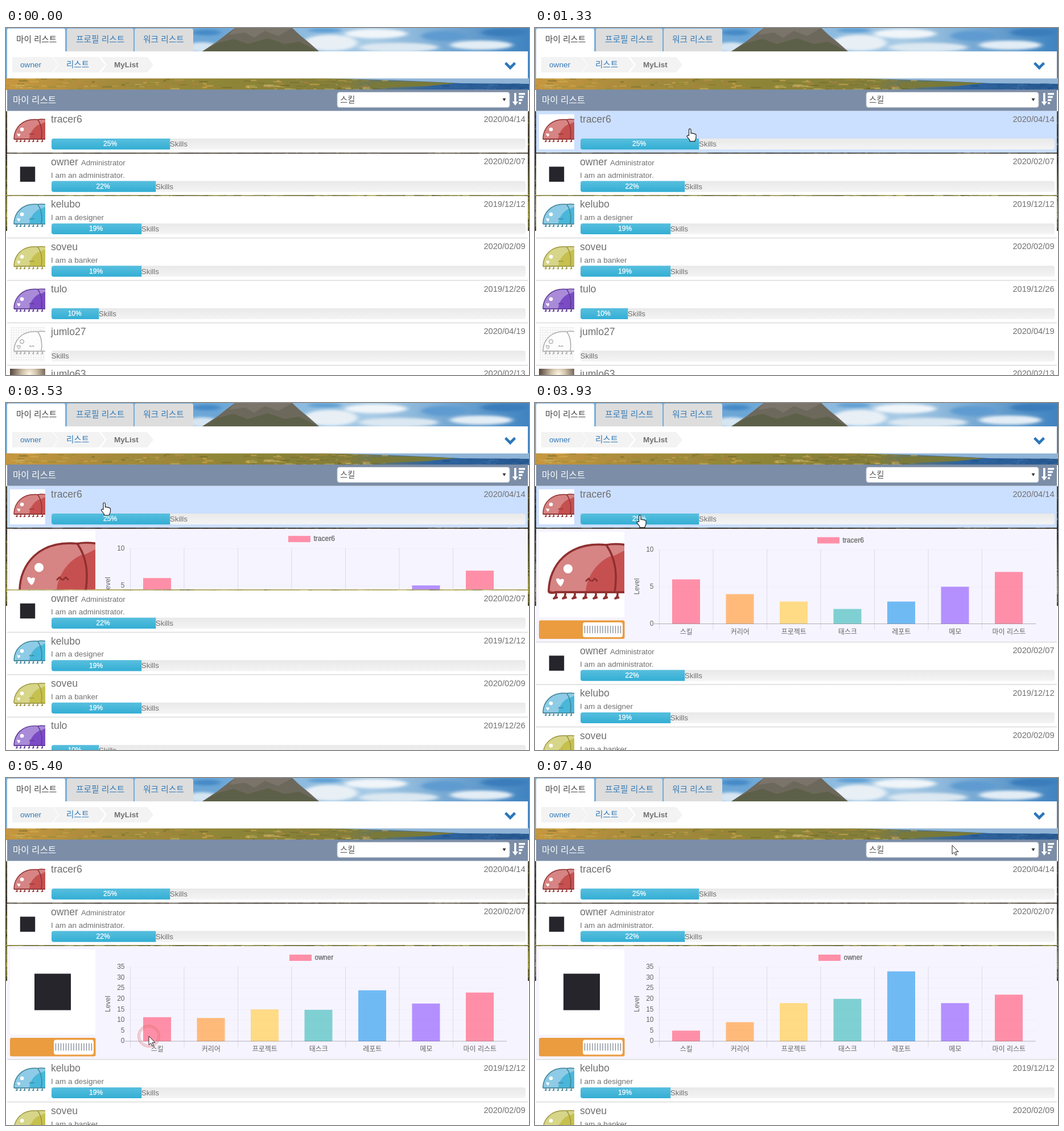
An HTML page for the animation above (8 s loop, 919 by 609 pixels).

```html
<!DOCTYPE html>
<html lang="ko">
<head>
<meta charset="utf-8">
<title>마이 리스트</title>
<style>
html, body { margin: 0; width: 100%; height: 100%; overflow: hidden; background: #fff; }
svg { display: block; }
text { font-family: "Liberation Sans", "Noto Sans CJK KR", "Noto Sans CJK JP", sans-serif; fill: #707070; }
.ko { font-family: "Noto Sans CJK KR", "Noto Sans CJK JP", sans-serif; }
.link { fill: #337ab7; }
.axis text { font-size: 12px; fill: #666; }
</style>
</head>
<body>
<svg id="stage" width="919" height="609" viewBox="0 0 919 609"></svg>
<script>
const LOOP = 8000, TOP = 146, PITCH = 74.45, PANEL_Y = TOP + PITCH, PANEL_H = 200;
const OPEN_AT = 3215, OPEN_MS = 600, SWAP_AT = 5195, CLICKS = [3130, 5150];
const BASE = 387.5, PLOT = 130, STEP = 94.5, LEFT = 218.5;

const rows = [
  { name: 'tracer6', date: '2020/04/14', pct: 25, bug: ['#d68484', '#c65050', '#8f3030'] },
  { name: 'owner', role: 'Administrator', about: 'I am an administrator.', date: '2020/02/07', pct: 22 },
  { name: 'kelubo', about: 'I am a designer', date: '2019/12/12', pct: 19, bug: ['#8ecbe6', '#49b7da', '#3c8296'] },
  { name: 'soveu', about: 'I am a banker', date: '2020/02/09', pct: 19, bug: ['#d6d588', '#c6c04e', '#9c9640'] },
  { name: 'tulo', date: '2019/12/26', pct: 10, bug: ['#a98bd9', '#7b4bc6', '#5a3792'] },
  { name: 'jumlo27', date: '2020/04/19', pct: 0, bug: ['#fdfdfd', '#fdfdfd', '#aaa'], grid: true },
  { name: 'jumlo63', date: '2020/02/13', pct: 0, photo: true }
];
const charts = [
  { who: 0, max: 10, vals: [6, 4, 3, 2, 3, 5, 7], legend: 496 },
  { who: 1, max: 35, vals: [5, 9, 18, 20, 33, 18, 22], legend: 498 }
];
const cats = ['스킬', '커리어', '프로젝트', '태스크', '레포트', '메모', '마이 리스트'];
const hues = ['#ff8fa8', '#ffba7a', '#ffdb86', '#7fd0d2', '#70baf4', '#b490ff', '#ff8fa8'];

// time, x, y of the pointer
const path = [
  [600, -16, 428], [1330, 272, 178], [1400, 258, 177], [1470, 254, 177], [1670, 199, 176], [1930, 199, 176],
  [2150, 192, 240], [2470, 190, 240], [2720, 172.5, 176], [3700, 172.5, 176], [4150, 206, 240], [4400, 246, 325],
  [4670, 248, 430.5], [4850, 251, 453], [5900, 251, 453], [6730, 648, 206], [6800, 648, 206], [7400, 733, 118]
];

const clamp = v => Math.max(0, Math.min(1, v));
const swing = p => 0.5 - Math.cos(Math.PI * clamp(p)) / 2;
const outQuart = p => 1 - (1 - clamp(p)) ** 4;
const $ = id => document.getElementById(id);
const range = n => [...Array(n).keys()];

let seed = 7;
const rnd = () => (seed = seed * 16807 % 2147483647) / 2147483647;

const rect = (x, y, w, h, fill, more = '') =>
  `<rect x="${x}" y="${y}" width="${w}" height="${h}" fill="${fill}" ${more}/>`;
const text = (x, y, size, str, more = '') =>
  `<text x="${x}" y="${y}" font-size="${size}" ${more}>${str}</text>`;
const shape = (d, fill, more = '') => `<path d="${d}" fill="${fill}" ${more}/>`;
const gradient = (id, stops, dir = 'x2="0" y2="1"') => `<linearGradient id="${id}" ${dir}>` +
  stops.map(([at, c]) => `<stop offset="${at}" stop-color="${c}"/>`).join('') + '</linearGradient>';

function specks(n, x, y, w, h, colors) {
  return range(n).map(() => rect((x + rnd() * w).toFixed(1), (y + rnd() * h).toFixed(1),
    (3 + rnd() * 16).toFixed(1), (1 + rnd() * 2).toFixed(1), colors[Math.floor(rnd() * colors.length)], 'opacity=".55"')).join('');
}

function landscape() {
  const cloud = (x, y, rx, ry, c) => `<ellipse cx="${x}" cy="${y}" rx="${rx}" ry="${ry}" fill="${c}"/>`;
  return rect(0, 0, 919, 88, 'url(#sky)') +
    '<g filter="url(#soft)">' +
    cloud(345, 34, 30, 9, '#d5e5f2') + cloud(352, 8, 25, 5, '#4489c6') + cloud(570, 26, 48, 14, '#e8f0f6') +
    cloud(650, 10, 55, 8, '#f0f5f9') + cloud(690, 34, 70, 8, '#dce8f1') + cloud(770, 14, 40, 9, '#5e9bd0') +
    cloud(835, 30, 55, 8, '#e3edf5') + cloud(875, 8, 40, 7, '#3b7dbb') + cloud(560, 4, 30, 4, '#5d9fd4') + '</g>' +
    shape('M345 41L372 23 390 9 402 0H503L517 13 533 26 550 41Z', '#6d685c') +
    shape('M345 41L372 26 400 19 425 28 460 18 490 28 515 24 550 41Z', '#5d6048') +
    shape('M402 0L392 12 420 8 436 17 455 5 478 14 503 0Z', '#7b746a') +
    rect(0, 88, 919, 21, 'url(#land)') +
    specks(170, 0, 88, 680, 20, ['#d8b050', '#6d6428', '#a6913e', '#8b8a38', '#b7803c', '#c9b766']) +
    shape('M560 88H919V98L800 97 690 92Z', '#8fb4d6') +
    shape('M640 95Q700 91 790 97L740 102 640 106Z', '#78793a') +
    specks(26, 760, 97, 150, 10, ['#21508a', '#3e74ab']) +
    rect(0, 146, 919, 210, 'url(#ground)') +
    specks(130, -8, 216, 927, 4, ['#15110d', '#5d4a35', '#37301f', '#8a8272']) +
    specks(130, -8, 291, 927, 5, ['#b3a83e', '#2f3018', '#77792e', '#c9bd6a']) +
    specks(90, -8, 324, 927, 6, ['#c8b74a', '#73762e', '#e0d38a', '#4b5020']) +
    specks(40, -8, 146, 10, 208, ['#1b1812', '#a59a4c', '#5d5a30']) +
    specks(40, 915, 146, 4, 208, ['#1b1812', '#a59a4c', '#5d5a30']) +
    rect(0, 356, 919, 253, '#fff') + rect(2, 356, 915, 253, '#dedede');
}

function header() {
  const tab = (x, w, fill) => shape(`M${x} 41V4q0-3 3-3H${x + w - 3}q3 0 3 3V41Z`, fill);
  const crumb = (x, tail, tip, notch) => shape(`M${x} 51H${tail}L${tip} 64.5 ${tail} 78H${x}${notch ? 'l10-13.5Z' : 'Z'}`, '#f3f3f3');
  return tab(2, 102, '#fff') + tab(107, 117, '#ddd') + tab(226, 103, '#ddd') +
    text(18, 25, 14.6, '마이 리스트', 'class="ko" style="fill:#444"') +
    text(123, 25, 14.7, '프로필 리스트', 'class="ko link"') +
    text(241, 25, 14.7, '워크 리스트', 'class="ko link"') +
    rect(2, 41, 915, 47.5, '#fff') +
    crumb(11, 81, 92) + crumb(83, 163, 174, true) + crumb(167, 248, 259, true) +
    text(25, 69, 13.6, 'owner', 'class="link"') +
    text(106, 68.5, 14.5, '리스트', 'class="ko link"') +
    text(190, 69, 13.5, 'MyList', 'font-weight="bold"') +
    shape('M876 63l3.2-3.2 6.8 6.8 6.8-6.8 3.2 3.2-10 10.2Z', '#2b76bb') +
    rect(2, 108, 915, 37.5, '#7b8da7') +
    text(12, 131.5, 15.6, '마이 리스트', 'class="ko" style="fill:#fff"') +
    rect(582, 112.5, 303, 27, '#fff', 'rx="4" stroke="#b5bcc6"') +
    text(587, 131, 14.3, '스킬', 'class="ko" style="fill:#555"') +
    shape('M872.5 123.5h6l-3 5Z', '#333') +
    shape('M893 114h3.6v15h3.4l-5.2 7-5.2-7H893Z', '#fff') +
    [11, 8.8, 6.4, 4].map((w, i) => rect(901, 114 + i * 5.4, w, 3.3, '#fff')).join('');
}

// drawn in a 150 by 150 box
function beetle([skin, wing, line]) {
  const legs = [30, 46, 63, 82, 100, 118, 138].map(x => `M${x} 107q1 7-4 10l7-2`).join('');
  return `<g stroke="${line}" stroke-width="3.6" stroke-linejoin="round">` + shape(legs, 'none') +
    shape('M17 104C18 60 50 17 118 23Q134 20 152 23V106H30Q17 109 17 104Z', skin) +
    shape('M82 106C84 75 106 50 128 42Q136 72 133 106ZM133 106Q136 70 130 43L152 32V106Z', wing, 'stroke="none"') +
    shape('M118 23Q141 55 133 106M17 104Q20 108 30 106H152', 'none') +
    shape('M82 87l5-5 5 5M93 87l5-5 5 5', 'none', 'stroke-width="2.6"') + '</g>' +
    `<g fill="#fff" stroke="${line}" stroke-width="${skin === '#fdfdfd' ? 3 : 0}"><circle cx="51" cy="65" r="8"/>` +
    '<path d="M30 83q4-3 7 1q4-3 7 0q-1 8-6 12q-7-5-8-13Z"/></g>';
}

function avatar(r) {
  let art = rect(0, 0, 150, 150, r.photo ? 'url(#snap)' : '#fff');
  if (r.grid) art += shape(range(14).map(i => `M${6 + i * 10.5} 0V150M0 ${6 + i * 10.5}H150`).join(''), 'none', 'stroke="#e8e8e8" stroke-width="2"');
  if (r.bug) art += beetle(r.bug);
  else if (!r.photo) art += rect(43, 43, 64, 64, '#25252b');
  return `<svg width="150" height="150">${art}</svg>`;
}

function row(r, i) {
  const w = 833 * r.pct / 100;
  return `<g id="row${i}">` + rect(2, 0, 915, 72.8, '#fff', `id="back${i}"`) +
    `<g transform="translate(7 5.2) scale(.413)">${avatar(r)}</g>` +
    text(79, 20.3, 17.6, r.name + (r.role ? `<tspan dx="5" font-size="13.2">${r.role}</tspan>` : '')) +
    text(79, 42.2, 13.5, r.about || '') +
    text(912.5, 18.8, 14.6, r.date, 'text-anchor="end"') +
    rect(80, 48, 833, 19.2, 'url(#track)', 'rx="4"') +
    (w ? shape(`M84 48H${80 + w}V67.2H84q-4 0-4-4V52q0-4 4-4Z`, 'url(#fill)') +
      text(80 + w / 2 - 1, 61.3, 12, r.pct + '%', 'text-anchor="middle" style="fill:#fff" stroke="#fff" stroke-width=".25"') : '') +
    text(79.5 + w, 62.2, 13.4, 'Skills') + '</g>';
}

function axes(c, k) {
  const n = c.max / 5;
  const ticks = range(n + 1).map(i => {
    const y = BASE - PLOT * i / n;
    return text(208.5, y + 3.3, 12, i * 5, 'text-anchor="end"') +
      shape(`M209 ${y}H880`, 'none', `stroke="#000" stroke-opacity="${i ? 0.025 : 0.28}"`);
  }).join('');
  return `<g id="axes${k}" class="axis">` + ticks + rect(c.legend, 235.5, 39, 11, hues[0]) +
    text(c.legend + 44.5, 244.5, 11.8, rows[c.who].name, 'stroke="#666" stroke-width=".3"') +
    `<g transform="translate(7 226)">${avatar(rows[c.who])}</g></g>`;
}

function panel() {
  const lines = range(8).map(i => `M${LEFT + i * STEP} 257V${i === 7 ? 257 : 398}`).join('');
  return '<svg id="panel" x="0" width="919" overflow="hidden">' + rect(2, 0, 915, 200, '#f6f4ff') + '<g id="inner">' +
    shape(lines, 'none', 'stroke="#000" stroke-opacity=".1"') +
    cats.map((c, i) => rect(LEFT + i * STEP + 22.5, 0, 49, 0, hues[i], `id="bar${i}"`)).join('') +
    charts.map(axes).join('') +
    '<g class="axis">' + cats.map((c, i) =>
      text(LEFT + (i + 0.5) * STEP, 405.5, 12, c, 'class="ko" text-anchor="middle"')).join('') +
    text(0, 0, 12, 'Level', 'text-anchor="middle" transform="translate(182.5 322) rotate(-90)"') + '</g>' +
    rect(7, 381.5, 150.5, 32.5, '#ea9c3f', 'rx="3"') + rect(84, 385, 70, 26, '#fff', 'rx="4"') +
    shape(range(15).map(i => `M${87.5 + i * 4.5} 391V404`).join(''), 'none', 'stroke="#7d8794" stroke-width="1.3"') +
    '<g id="tip">' + shape('M266 309.5l7-6V293q0-4 4-4H342q4 0 4 4V326q0 4-4 4H277q-4 0-4-4V315.5Z', '#000', 'opacity=".8"') +
    text(279, 303, 12, cats[0], 'class="ko" font-weight="bold" style="fill:#fff"') +
    rect(279.5, 312.5, 10, 10, hues[0], 'stroke="#fff"') +
    text(292.5, 321.5, 11.8, rows[0].name + ': 6', 'style="fill:#fff"') + '</g></g></svg>';
}

$('stage').innerHTML = '<defs>' +
  gradient('sky', [[0, '#7fb2dc'], [0.4, '#6ba6d6'], [0.7, '#a9cbe5'], [1, '#3f83c0']], 'x2="1" y2="0"') +
  gradient('land', [[0, '#c7973f'], [0.2, '#a58a3c'], [0.42, '#8f8537'], [0.66, '#817c3a'], [0.76, '#4c6f86'], [0.82, '#2d639e'], [1, '#28598f']], 'x2="1" y2="0"') +
  gradient('ground', [[0, '#4a4430'], [0.35, '#2c261d'], [0.7, '#66662d'], [0.87, '#a29a40'], [1, '#32331c']]) +
  gradient('track', [[0, '#e9e9e9'], [1, '#f4f4f4']]) +
  gradient('fill', [[0, '#58bfde'], [1, '#33aed4']]) +
  '<radialGradient id="snap" cx=".55" cy=".15" r=".6"><stop offset="0" stop-color="#fff6e2"/><stop offset=".35" stop-color="#cfc0a8"/><stop offset="1" stop-color="#44342e"/></radialGradient>' +
  '<filter id="soft"><feGaussianBlur stdDeviation="5 2"/></filter></defs>' +
  landscape() + header() + rows.map(row).join('') + panel() +
  '<g id="pointer"><g id="ring" fill="none" stroke="#dd6a6a">' +
  '<circle r="17" stroke-width="4.5" stroke-dasharray="1.2 1"/><circle r="19.4" stroke-width="1"/></g>' +
  shape('M0 0V15.5L3.6 12.2 6 17.6 8.4 16.6 6 11.4H11Z', '#fff', 'id="arrow" stroke="#222"') +
  shape('M-1.5 11V1Q-1.5-1 .2-1T2 1V7Q4 5.5 5.5 7.5 7.5 6.3 8.5 8.3 11 7.6 11 10V14Q11 17 9 19.5V21H0V19Q-2 16.5-5 12.5-5 10-2.5 10.5Z',
    '#fff', 'id="hand" stroke="#222" stroke-width="1.2" stroke-linejoin="round"') + '</g>';

const show = (id, on) => $(id).setAttribute('display', on ? 'inline' : 'none');
const move = (id, x, y) => $(id).setAttribute('transform', `translate(${x} ${y})`);

// monotone cubic through the path points
function pointerAt(t, axis) {
  const last = path.length - 1;
  if (t >= path[last][0]) return path[last][axis];
  const k = Math.max(0, path.findIndex(p => p[0] > t) - 1);
  const slope = i => i < 0 || i >= last ? 0 : (path[i + 1][axis] - path[i][axis]) / (path[i + 1][0] - path[i][0]);
  const tangent = i => { const a = slope(i - 1), b = slope(i); return a * b <= 0 ? 0 : 2 * a * b / (a + b); };
  const h = path[k + 1][0] - path[k][0], u = clamp((t - path[k][0]) / h), v = 1 - u;
  return path[k][axis] * v * v * (1 + 2 * u) + path[k + 1][axis] * u * u * (3 - 2 * u) +
    h * (tangent(k) * u * v * v - tangent(k + 1) * u * u * v);
}

function render(t) {
  const open = swing((t - OPEN_AT) / OPEN_MS), swapped = t >= SWAP_AT, owner = swapped ? 1 : 0;
  const x = pointerAt(t, 1), y = pointerAt(t, 2);
  let over = false;

  rows.forEach((r, i) => {
    const top = TOP + PITCH * i + (i > owner ? PANEL_H * open : 0);
    const hit = t > 600 && x > 2 && x < 917 && y >= top && y < top + 72.8;
    over = over || hit;
    move('row' + i, 0, top);
    $('back' + i).setAttribute('fill', hit ? '#cbdfff' : '#fff');
  });

  show('panel', open > 0);
  $('panel').setAttribute('y', PANEL_Y + PITCH * owner);
  $('panel').setAttribute('height', Math.max(0, PANEL_H * open - 1.6));
  move('inner', 0, -PANEL_Y - 5 * (1 - open));
  charts.forEach((c, k) => show('axes' + k, k === owner));

  const [a, b] = charts, mix = outQuart((t - SWAP_AT) / 1000);
  cats.forEach((c, i) => {
    const from = a.vals[i] / a.max, to = b.vals[i] / b.max, h = PLOT * (from + (to - from) * mix);
    $('bar' + i).setAttribute('y', BASE - h);
    $('bar' + i).setAttribute('height', h);
  });
  $('tip').setAttribute('opacity', outQuart((t - 4360) / 400) * (1 - outQuart((t - 4575) / 400)));

  show('pointer', t > 600);
  move('pointer', x, y);
  show('hand', over);
  show('arrow', !over);
  const age = t - (CLICKS.find(c => t >= c && t < c + 350) ?? Infinity);
  show('ring', age >= 0);
  if (age >= 0) {
    $('ring').setAttribute('transform', `scale(${0.45 + 0.55 * age / 250})`);
    $('ring').setAttribute('opacity', 0.6 * clamp((350 - age) / 120));
  }
}

const start = performance.now();
function tick() {
  render((performance.now() - start) % LOOP);
  requestAnimationFrame(tick);
}
tick();
</script>
</body>
</html>
```
